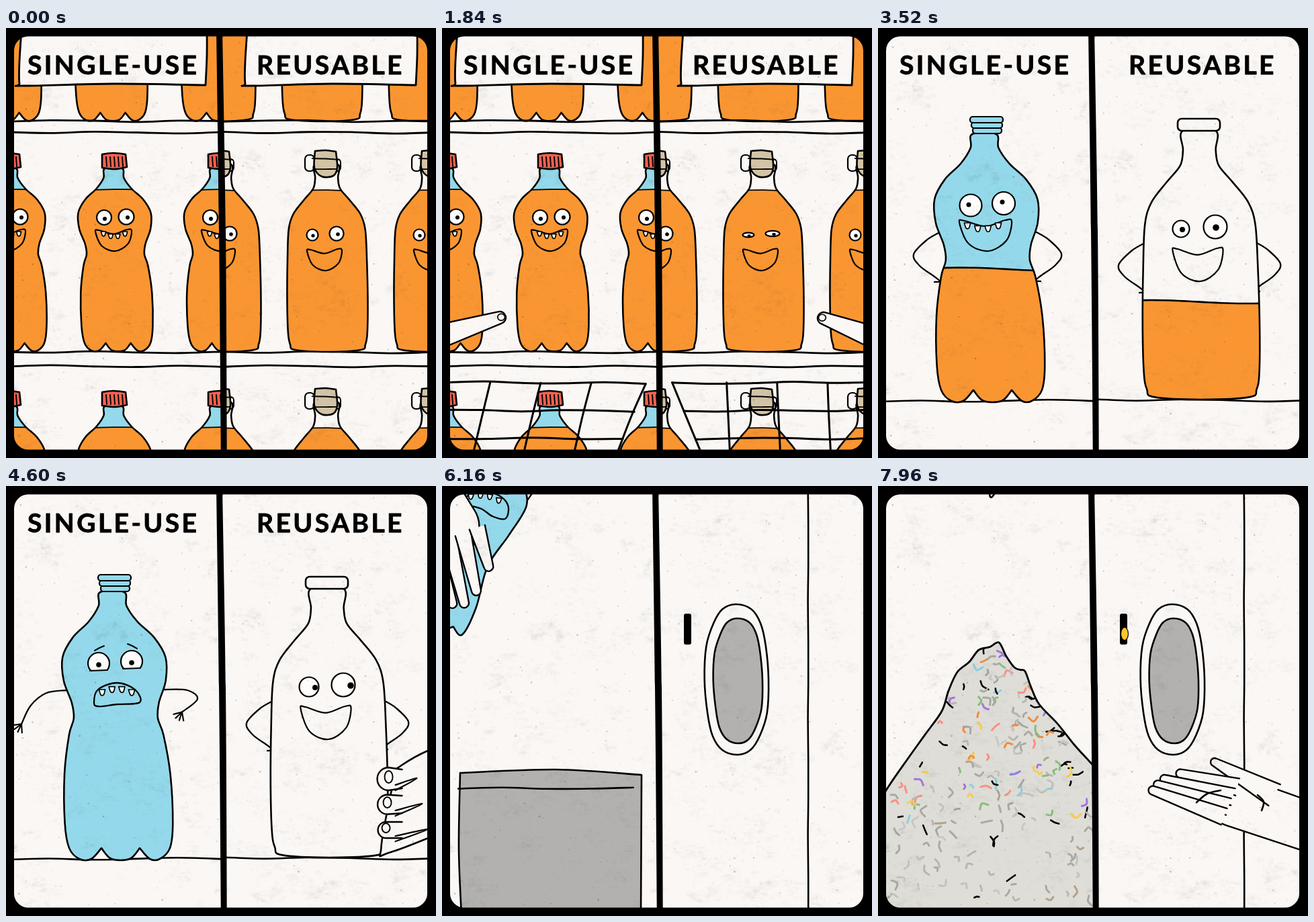
Recreate the animation shown at these times as an HTML page with a canvas. Size 640 by 640 pixels, loop 8 s.

```html
<!DOCTYPE html>
<html lang="en">
<head>
<meta charset="utf-8">
<title>Single-use and reusable</title>
<style>
html, body { margin: 0; width: 100%; height: 100%; overflow: hidden; background: #000; }
canvas { display: block; width: 100vw; height: 100vh; }
</style>
</head>
<body>
<canvas id="stage" width="640" height="640"></canvas>
<script>
const LOOP = 8000, INK = 2.6;
const PAPER = '#fbf7f4', ORANGE = '#fa9632', BLUE = '#94d9eb', GREY = '#b2b1b0', RED = '#f7614f', CORK = '#d3c4a6', WHITE = '#fffdfb';
const ctx = document.getElementById('stage').getContext('2d');

// --- Timing ---
const mix = (a, b, u) => a + (b - a) * u;
const span = (t, a, b) => Math.max(0, Math.min(1, (t - a) / (b - a)));
const ease = (t, a, b) => { const u = span(t, a, b); return u * u * (3 - 2 * u); };
const blink = (t, a, b) => 1 - Math.sin(Math.PI * span(t, a, b)) * .9;
function random(seed) {
  return () => (seed = (seed * 16807) % 2147483647) / 2147483647;
}

// --- Pen ---
// Smooth curve through [x, y] points; a third truthy entry makes a corner.
function spline(list, closed) {
  const pts = list.flatMap(p => p[2] ? [p, p] : [p]), n = pts.length, path = new Path2D();
  const get = i => pts[closed ? (i + n) % n : Math.max(0, Math.min(n - 1, i))];
  path.moveTo(pts[0][0], pts[0][1]);
  for (let i = 0; i < (closed ? n : n - 1); i++) {
    const a = get(i - 1), b = get(i), c = get(i + 1), d = get(i + 2);
    if (b === c) continue;
    path.bezierCurveTo(b[0] + (c[0] - a[0]) / 6, b[1] + (c[1] - a[1]) / 6,
      c[0] - (d[0] - b[0]) / 6, c[1] - (d[1] - b[1]) / 6, c[0], c[1]);
  }
  if (closed) path.closePath();
  return path;
}
function ink(path, color, w = INK) {
  if (color) { ctx.fillStyle = color; ctx.fill(path); }
  if (w) { ctx.lineWidth = w; ctx.stroke(path); }
}
const line = (pts, w) => ink(spline(pts), null, w);
const shape = (pts, color, w) => ink(spline(pts, true), color, w);
// Hand-drawn straight stroke.
function wire(x0, y0, x1, y1, w = INK) {
  const n = Math.max(2, Math.round(Math.hypot(x1 - x0, y1 - y0) / 60)), pts = [];
  for (let i = 0; i <= n; i++) {
    const off = 1.3 * Math.sin(i * 2.1 + x0 + y0);
    pts.push([mix(x0, x1, i / n) + off * .3, mix(y0, y1, i / n) + off]);
  }
  line(pts, w);
}
function oval(x, y, rx, ry, color, w = 2) {
  const path = new Path2D();
  path.ellipse(x, y, rx, ry, 0, 0, 7);
  ink(path, color, w);
}
function box(x, y, w, h, r, color, ink_ = INK) {
  const path = new Path2D();
  path.roundRect(x, y, w, h, r);
  ink(path, color, ink_);
}
// Tall rounded ring, squarer than an ellipse.
function hatch(cx, cy, rx, ry, color) {
  const pts = [], bend = v => Math.sign(v) * Math.abs(v) ** .85;
  for (let i = 0; i < 16; i++) {
    const a = i * Math.PI / 8;
    pts.push([cx + rx * bend(Math.cos(a)) + Math.sin(i * 2), cy + ry * bend(Math.sin(a))]);
  }
  shape(pts, color);
}
// Tapered arm or finger with an open base, a round tip and maybe a nail.
function limb(x0, y0, r0, x1, y1, r1, nail) {
  const a = Math.atan2(y1 - y0, x1 - x0), nx = -Math.sin(a), ny = Math.cos(a), path = new Path2D();
  path.moveTo(x0 + nx * r0, y0 + ny * r0);
  path.lineTo(x1 + nx * r1, y1 + ny * r1);
  path.arc(x1, y1, r1, a + Math.PI / 2, a - Math.PI / 2, true);
  path.lineTo(x0 - nx * r0, y0 - ny * r0);
  ink(path, PAPER, 2.4);
  if (nail) oval(x1 + Math.cos(a) * r1 * .25, y1 + Math.sin(a) * r1 * .25, r1 * .6, r1 * .55, PAPER, 1.7);
}
// Thin arm ending in a fan of little fingers.
function arm(pts, turn) {
  const [x, y] = pts[pts.length - 1];
  line(pts, 2.3);
  for (let i = -1.5; i < 2; i++) {
    const a = turn + i * .5;
    line([[x, y], [x + 13 * Math.cos(a), y + 13 * Math.sin(a)]], 2.1);
  }
}
function at(x, y, draw, turn = 0, px = 0, py = 0) {
  ctx.save();
  ctx.translate(x + px, y + py);
  ctx.rotate(turn);
  ctx.translate(-px, -py);
  draw();
  ctx.restore();
}
function inside(path, draw) {
  ctx.save();
  ctx.clip(path);
  draw();
  ctx.restore();
}
function flood(y, color, h = 600) {
  ctx.fillStyle = color;
  ctx.fillRect(0, y, 640, h);
}

// --- Bottles: [depth, half width] profiles shared by both sizes ---
const PET = [[0, 13], [14, 15], [30, 26], [46, 43], [66, 54], [90, 53], [112, 45], [128, 43], [145, 48], [185, 53], [235, 53], [260, 49]];
const GLASS = [[0, 17], [20, 17], [36, 20], [53, 34], [74, 50], [97, 57], [140, 59], [200, 60], [250, 59], [268, 56], [276, 49]];

function outline(profile, cx, top, bottom, wide, drift, flare, feet) {
  const depth = profile[profile.length - 1][0], k = (bottom - top) / (depth + (feet ? 11 : 2));
  const side = dir => profile.map(([y, r]) => {
    const u = y / depth;
    return [cx + drift * u + dir * r * (wide + flare * u), top + y * k];
  });
  const left = side(-1), right = side(1), base = [];
  const [a] = left[left.length - 1], [b] = right[right.length - 1];
  if (feet) [0, .32, .7, 1].forEach((f, i, cuts) => {
    if (!i) return;
    base.push([mix(a, b, cuts[i - 1] + .1), bottom], [mix(a, b, f - .1), bottom]);
    if (f < 1) base.push([mix(a, b, f), bottom - 11 * k, 1]);
  });
  else base.push([mix(a, b, .5), bottom + 1]);
  return spline([...left, ...base, ...right.reverse()], true);
}
const soda = outline(PET, 160, 209, 480, 1, 6, 0, true);
const flask = outline(GLASS, 477, 203, 481, 1, 2, 0);
const pet = outline(PET, 158, 158, 555, 1.38, 11, .15, true);
const glass = outline(GLASS, 478, 153, 552, 1.43, 4, .03);

function eye(x, y, r, dx, dy, pupil, open = 1) {
  oval(x, y, r, Math.max(1, r * open), WHITE, 2.2);
  oval(x + dx, y + dy, pupil, pupil * Math.min(1, open + .3), '#000', 0);
}
function grin(x, y, w, h, color) {
  const half = w / 2;
  shape([[x - half, y + 2], [x - half * .8, y], [x, y + h * .18], [x + half * .75, y - 1], [x + half, y + 1],
    [x + half * .8, y + h * .65], [x + half * .1, y + h], [x - half * .65, y + h * .75]], color, 2.2);
}
function teeth(x, y, w, size, sag) {
  for (let i = 0; i < 4; i++) {
    const f = i / 1.5 - 1, cx = x + f * w / 2, cy = y + sag * (1 - f * f);
    shape([[cx - size, cy, 1], [cx - size * .4, cy + size * 1.7], [cx + size * .5, cy + size * 1.7], [cx + size, cy, 1]], WHITE, 1.7);
  }
}
function drawSoda(face, open) {
  inside(soda, () => {
    flood(200, BLUE, 42);
    flood(241, ORANGE);
    wire(100, 241, 220, 241, 1.8);
  });
  ink(soda);
  shape([[143, 188, 1], [160, 186], [178, 188, 1], [180, 207, 1], [162, 210], [143, 208, 1]], RED);
  for (let x = 149; x < 176; x += 6) line([[x, 192], [x + 1, 206]], 1.9);
  if (!face) return;
  eye(146, 282, 11, 1, 2, 3, open);
  eye(179, 281, 11.5, 2, 1, 3, open);
  grin(160, 301, 54, 31, ORANGE);
  teeth(161, 303, 32, 3.6, 4);
}
function drawFlask(face, open) {
  inside(flask, () => {
    flood(200, PAPER, 43);
    flood(242, ORANGE);
    wire(440, 242, 520, 242, 1.8);
  });
  ink(flask);
  box(445, 189, 14, 24, 6, null, 2.2);
  box(486, 195, 12, 18, 5, null, 2);
  shape([[460, 183, 1], [476, 182], [491, 184, 1], [493, 208], [487, 220], [470, 221], [459, 208]], CORK);
  wire(456, 195, 496, 195, 1.9);
  wire(458, 209, 493, 211, 1.9);
  if (!face) return;
  eye(456, 308, 8.5, 1, 1, 2.6, open);
  eye(492, 306, 10.5, 2, 1, 2.8, open);
  grin(474, 330, 52, 31);
}

// --- Shelf ---
function shelf(x, bottle, gap) {
  for (let row = -1; row < 2; row++) {
    for (const col of [-1, 1]) at(gap * col - (row < 0 ? 8 : 0), row * 349 + (row < 0 ? 6 : 5 * row), () => bottle(!row));
    if (row) at(row * 4 - 4, row * 349 + (row < 0 ? 6 : 5), () => bottle(false));
    if (row < 1) [[138, 482], [155, 503]].forEach(ys => wire(x, ys[row + 1], x + 320, ys[row + 1] + 1, 2.8));
  }
}
function basket(t, edge, dir, lean) {
  if (t < 960) return;
  at(0, mix(112, 0, ease(t, 960, 1680)), () => {
    for (let j = 0; j < 3; j++) wire(edge - dir * 17 * j, 529 + 41 * j, edge - dir * 300, 527 + 42 * j, 3);
    for (let i = 0; i < 4; i++) {
      const x = edge - dir * (i && 6 + 75 * i);
      wire(x, 529, i ? x - lean : x - dir * 41, 628, 3);
    }
  });
}
// Draws a reaching finger, then the bottle carried down between the two halves of a hand.
function carry(t, dx, dy, point, back, bottle, front) {
  const k = ease(t, 2040, 2440), drop = Math.max(0, t - 2440) * .3, up = ease(t, 1840, 2040);
  const reach = ease(t, 1080, 1800), held = t >= 2040;
  const hand = draw => held && at(dx * (k - 1), dy * (k - 1) + drop, draw);
  hand(back);
  bottle(k, drop);
  hand(front);
  if (t > 960 && !held) at(Math.sign(point) * (110 * (1 - reach) - 20 * up), -50 * up, () =>
    point < 0 ? limb(-100, 489, 27, 86, 431, 9, true) : limb(760, 505, 28, 568, 432, 9, true));
}
const sign = (a, b) => shape([[a + 4, -10, 1], [a, 50], [a, 82], [a + 6, 86], [(a + b) / 2, 83], [b - 2, 85, 1], [b, 40], [b, -10, 1]], PAPER, 2.8);

function shelfLeft(t) {
  shelf(2, drawSoda, 158);
  carry(t, 47, 170, -1, () => {
    limb(-150, 488, 34, 140, 496, 33);
    for (let i = 0; i < 3; i++) limb(215, 490 + i * 17, 9, 231, 483 + i * 16, 8);
  }, (k, drop) => at(47 * k, 170 * k + drop, () => drawSoda(true, blink(t, 1240, 1480)), .27 * k, 161, 198),
  () => limb(100, 510, 17, 180, 528, 9, true));
  basket(t, 303, 1, 25);
  sign(20, 299);
}
function shelfRight(t) {
  shelf(322, drawFlask, 159);
  carry(t, 28, 115, 1, () => {
    limb(790, 483, 45, 600, 482, 44);
    for (let i = 0; i < 4; i++) limb(456, 447 + i * 20, 10, 445, 447 + i * 20, 10);
  }, (k, drop) => at(34 * k, 115 * k + drop, () =>
    drawFlask(true, Math.min(blink(t, 180, 500), blink(t, 1780, 2040))), .06 * k, 476, 202),
  () => limb(590, 500, 24, 492, 497, 10, true));
  basket(t, 343, -1, -4);
  sign(356, 612);
}

// --- Standing bottles ---
function vessel(path, base, level, t) {
  inside(path, () => {
    flood(100, base);
    if (level > 552) return;
    const wave = new Path2D();
    wave.moveTo(-9, 650);
    for (let x = -9; x < 650; x += 8) wave.lineTo(x, level + 2.5 * Math.sin(x / 45 + t / 130));
    wave.lineTo(650, 650);
    ink(wave, ORANGE);
  });
  ink(path);
}
const drain = (t, from, power) => mix(from, 556, 1 - (1 - span(t, 3440, 3920)) ** power);
const akimbo = (x, y, dir) =>
  line([[x, y], [x + dir * 20, y + 12], [x + dir * 39, y + 33], [x + dir * 30, y + 50], [x + dir * 8, y + 66], [x, y + 73], [x + dir * 8, y + 74]], 2.3);

function sadFace() {
  for (const [x, y, dir] of [[138, 264, 1], [187, 261, -1]]) {
    inside(spline([[x - 30, y - 30, 1], [x + 30, y - 30, 1], [x + 30, y + 10, 1], [x - 30, y + 12, 1]], true), () => eye(x, y, 16, 0, 2, 3.8));
    line([[x - 13, y + 11], [x + 13, y + 10]], 2.2);
    line([[x + 1 - dir * 7, y - 19], [x + 1, y - 23], [x + 1 + dir * 7, y - 26]], 2);
  }
  shape([[131, 322], [137, 303], [165, 293], [192, 303], [199, 322], [165, 325], [137, 328]], null, 2.3);
  teeth(165, 303, 44, 4.6, -5);
}
function standLeft(t) {
  const sad = t >= 4160, lift = ease(t, 5980, 6160) * -130;
  wire(0, 556, 320, 554);
  at(0, lift, () => {
    if (sad) {
      const wave = Math.sin(span(t, 4440, 5300) * Math.PI * 4) * .08;
      at(0, 0, () => arm([[90, 304], [60, 310], [38, 330], [26, 358]], 2.2), wave, 90, 304);
      at(0, 0, () => arm([[235, 303], [270, 306], [284, 320], [260, 338]], 2.2), -wave, 235, 303);
    } else {
      akimbo(92, 304, -1);
      akimbo(234, 303, 1);
    }
    vessel(pet, BLUE, drain(t, 197, 3.25), t);
    for (let i = 2; i >= 0; i--) box(137 + i * 2, 132 + i * 8, 49 - i * 3, 9, 4, BLUE, 2.2);
    if (sad) return sadFace();
    const open = blink(t, 3620, 3860);
    eye(138, 264, 16.5, -3, -1, 3.5, open);
    eye(187, 261, 17, -2, -2, 3.5, open);
    grin(160, 287, 78, 45);
    teeth(156, 290, 46, 4.6, 5);
  });
  if (t > 5600) at(mix(-190, 0, ease(t, 5600, 5980)), 150 + lift, crushHand);
}
function grabHand() {
  shape([[900, 250, 1], [627, 322], [530, 358], [485, 384, 1], [463, 500], [480, 507], [627, 452], [900, 370, 1]], PAPER);
  limb(720, 310, 32, 566, 396, 16, true);
  for (let i = 0; i < 3; i++) {
    const y = 399 + i * 38;
    limb(494, y, 14 - i, 474 - i * 2, y, 17 - i * 2.5);
    oval(474 - i * 2, y - 3, 6, 9 - i, PAPER, 1.9);
    line([[484, y + 17], [516 + i * 8, y - 1], [484, y + 9]], 2.2);
  }
}
function standRight(t) {
  const lift = ease(t, 4840, 5080), lower = ease(t, 5080, 5320), leave = ease(t, 5420, 5880);
  const x = 30 * lift + 42 * lower + 290 * leave, y = -110 * lift + 73 * lower - 50 * leave;
  const look = t > 4520;
  wire(320, 553, 640, 555);
  at(x, y, () => {
    if (t > 4840) arm([[394, 327], [365, 353], [325, 376]], 2.6);
    else { akimbo(397, 320, -1); akimbo(560, 318, 1); }
    vessel(glass, PAPER, drain(t, 215, 4.5), t);
    box(446, 135, 63, 18, 6, PAPER);
    const open = blink(t, 3620, 3860);
    eye(451, 299, look ? 14.5 : 12.5, look ? 9 : 2, 1, 4, open);
    eye(502, 296, 17.5, look ? 11 : 1, 1, 4.8, open);
    grin(476, 329, 75, 48);
  });
  if (t > 4440) at(x - 72 + mix(260, 0, ease(t, 4440, 4840)), y + 37, grabHand);
}

// --- Bin, heap and machine ---
function crushHand() {
  limb(-90, -80, 62, 100, 190, 47);
  for (let i = 0; i < 4; i++) {
    const u = i / 3;
    limb(mix(82, 144, u), mix(222, 190, u), 12, mix(109, 162, u), mix(304, 248, u) + 40 * u * (1 - u) * 2, 7);
  }
}
function crushed() {
  arm([[104, 142], [100, 108], [90, 71]], -1.8);
  arm([[215, 152], [228, 130], [236, 102]], -1.5);
  // Bent spine: x, y, half width.
  const spine = [[205, 62, 17], [194, 80, 15], [174, 105, 42], [161, 140, 57], [146, 185, 47], [125, 232, 38], [96, 282, 55], [72, 318, 61]];
  const edges = spine.map(([x, y, r], i) => {
    const a = spine[Math.max(0, i - 1)], b = spine[Math.min(spine.length - 1, i + 1)];
    const d = Math.hypot(b[0] - a[0], b[1] - a[1]), nx = (b[1] - a[1]) / d * r, ny = (a[0] - b[0]) / d * r;
    return [[x - nx, y - ny], [x + nx, y + ny]];
  });
  const left = edges.map(e => e[0]), right = edges.map(e => e[1]), feet = [];
  const a = left[left.length - 1], b = right[right.length - 1];
  for (let i = 1; i < 7; i++) {
    const u = i / 7, out = i % 3 ? 14 : -2;
    feet.push([mix(a[0], b[0], u) - out * .5, mix(a[1], b[1], u) + out, i % 3 === 0]);
  }
  shape([...left, ...feet, ...right.reverse()], BLUE);
  at(0, 0, () => oval(205, 61, 18, 8, BLUE, 2.3), .85, 205, 61);
  eye(146, 119, 11.5, -1, 0, 3);
  eye(185, 129, 12, 0, 1, 3);
  line([[140, 101], [147, 98], [153, 102]], 2);
  line([[183, 116], [191, 115], [197, 119]], 2);
  shape([[122, 156], [130, 143], [152, 138], [176, 145], [188, 160], [184, 178], [165, 175], [148, 164]], null, 2.3);
  at(0, 0, () => teeth(153, 145, 42, 4, -4), .12, 153, 145);
}
function binLeft(t) {
  const fall = span(t, 6960, 7260), out = ease(t, 6160, 6560) - 1, away = ease(t, 6960, 7240);
  const sway = Math.sin((6840 - t) / 75) * .05 * span(t, 6840, 6600);
  at(90 * out + 45 * fall, 130 * out + 480 * fall * fall, crushed, sway - fall * .5, 150, 200);
  at(90 * out - 180 * away, 130 * out - 180 * away, crushHand, sway, 60, 100);
  shape([[27, 427, 1], [170, 422], [297, 430, 1], [296, 640, 1], [29, 640, 1], [25, 540]], GREY);
  wire(24, 450, 285, 450);
}

const shards = ['#a9a8a4', '#c4c2bd', '#b8b6b1', '#aaa9a5', '#c9c7c2', '#b3a18c', '#f28b3c', '#a177dc', '#ffcb4a', '#8ecfe2', '#86bd7e', '#fb8f83'];
const ridge = [];
{
  const rnd = random(19), keys = [[-10, 490], [45, 405], [95, 335], [118, 277], [150, 244], [180, 233], [203, 270], [219, 276], [240, 325], [292, 385], [335, 432]];
  keys.forEach(([x, y], i) => {
    ridge.push([x, y]);
    const next = keys[i + 1];
    if (next) ridge.push([mix(x, next[0], .5) + rnd() * 4 - 2, mix(y, next[1], .5) + rnd() * 4 - 2]);
  });
}
const heapPath = spline([...ridge, [340, 660, 1], [-20, 660, 1]], true);
function heap(t) {
  at(0, mix(420, 0, ease(t, 7320, 7680)), () => {
    ink(heapPath, '#deddd7', 0);
    inside(heapPath, () => {
      const rnd = random(77);
      for (let i = 0; i < 230; i++) {
        const y = 245 + 375 * rnd() ** .8, half = 20 + (y - 240) * .64, edge = rnd() * 2 - 1;
        const dark = rnd() < (Math.abs(edge) > .7 ? .4 : .05), len = 3 + rnd() * 5, bend = rnd() * 2 - 1;
        ctx.strokeStyle = dark ? '#000' : shards[Math.floor(rnd() * (y > 500 ? 6 : shards.length))];
        at(178 + edge * half, y, () => line([[-len, 0], [0, len * bend], [len, dark ? len * bend : 0]], dark ? 2.6 : 3), rnd() * 6.3);
      }
    });
    line(ridge, 2.8);
  });
  if (t > 7880) at(0, mix(-30, 0, span(t, 7880, 7960)), () => line([[164, -4], [167, 16], [173, 12], [180, -4]]));
}
function pushHand() {
  shape([[540, 330], [640, 270, 1], [900, 270, 1], [900, 400, 1], [640, 372], [560, 372]], PAPER, 0);
  limb(720, 275, 27, 620, 272, 20);
  limb(620, 272, 19, 545, 297, 10, true);
  for (let i = 3; i >= 0; i--) {
    const x = 540 + i * 27, y = 364 - i * 6;
    oval(x, y, 13 + i * 2.5, 14 + i * 4, PAPER, 2.4);
    oval(x - i * .5, y - 2 - i * 3, 6, 6, PAPER, 1.7);
  }
}
function openHand() {
  limb(760, 548, 35, 530, 469, 38);
  limb(590, 460, 18, 501, 411, 6);
  for (let i = 0; i < 4; i++) {
    const u = i / 3;
    limb(mix(535, 515, u), mix(448, 492, u), 13, mix(450, 409, Math.sqrt(u)), mix(428, 453, u), 6.5);
  }
  line([[474, 471], [490, 458], [510, 453]]);
  line([[565, 460], [574, 470], [571, 483]]);
}
function machine(t) {
  wire(545, 0, 545, 640);
  box(360, 190, 11, 46, 3, '#000', 0);
  const coin = span(t, 7780, 7920);
  if (coin) oval(367, 220, 5.5 * coin, 9.5, '#fbc52d', 1.2);
  hatch(438.5, 288, 47.5, 112, PAPER);
  hatch(440.5, 290, 36.5, 93, GREY);
  const push = mix(318, 0, ease(t, 6160, 6720)) - 60 * ease(t, 6840, 7160);
  if (t < 7160) inside(spline([[412, 0, 1], [700, 0, 1], [700, 640, 1], [412, 640, 1]], true), () => at(push, 0, () => {
    line([[320, 224], [440, 227], [500, 233], [540, 246], [568, 263]]);
    line([[320, 362], [440, 369], [500, 374], [541, 374]]);
  }));
  if (t < 7400) at(push + 330 * ease(t, 7160, 7400), 0, pushHand);
  else at(mix(260, 0, ease(t, 7400, 7740)), 0, openHand);
}

// --- Paper grain, title and frame ---
const grain = document.createElement('canvas');
grain.width = grain.height = 640;
{
  const g = grain.getContext('2d'), rnd = random(4242);
  g.fillStyle = '#fff';
  g.fillRect(0, 0, 640, 640);
  for (let i = 0; i < 300; i++) {
    const cx = rnd() * 640, cy = rnd() * 640, size = 12 + rnd() * 30;
    for (let j = 0; j < 24; j++) {
      g.fillStyle = `rgba(100,110,115,${.01 + rnd() * .02})`;
      g.fillRect(cx + (rnd() + rnd() - 1) * size, cy + (rnd() + rnd() - 1) * size * .7, 1 + rnd() * 9, 1 + rnd() * 5);
    }
  }
  for (let i = 0; i < 600; i++) {
    g.fillStyle = `rgba(80,75,70,${.08 + rnd() * .25})`;
    g.beginPath();
    g.arc(rnd() * 640, rnd() * 640, .4 + rnd() * rnd() * 1.2, 0, 7);
    g.fill();
  }
}
function title() {
  ctx.font = '700 39px Lato, "Open Sans", sans-serif';
  ctx.letterSpacing = '3.4px';
  ctx.fillStyle = '#000';
  ctx.lineWidth = .8;
  for (const [word, x] of [['SINGLE-USE', 32], ['REUSABLE', 373]]) {
    ctx.fillText(word, x, 69);
    ctx.strokeText(word, x, 69);
  }
}
function panel(x, y, draw, t) {
  ctx.save();
  ctx.beginPath();
  ctx.rect(x, 0, 320, 640);
  ctx.clip();
  at(0, y, () => draw(t));
  ctx.restore();
}
function draw(t) {
  ctx.lineJoin = ctx.lineCap = 'round';
  ctx.strokeStyle = '#000';
  flood(0, PAPER, 640);
  const slide = ease(t, 2520, 2760) * 616;
  const scene = (y, left, right) => { panel(0, y, left, t); panel(320, y, right, t); };
  if (t < 2760) scene(-slide, shelfLeft, shelfRight);
  if (t >= 2520 && t < 6160) scene(616 - slide, standLeft, standRight);
  if (t >= 6160) scene(0, t < 7320 ? binLeft : heap, machine);
  if (t < 6160) title();
  ctx.globalCompositeOperation = 'multiply';
  ctx.drawImage(grain, 0, 0);
  ctx.globalCompositeOperation = 'source-over';
  shape([[313, 0, 1], [317, 300], [320, 640, 1], [329, 640, 1], [327, 300], [322, 0, 1]], '#000', 0);
  const frame = new Path2D();
  frame.rect(0, 0, 640, 640);
  frame.roundRect(12, 12.5, 615, 615, 21);
  ctx.fillStyle = '#000';
  ctx.fill(frame, 'evenodd');
}
const start = performance.now();
function tick() {
  draw((performance.now() - start) % LOOP);
  requestAnimationFrame(tick);
}
tick();
</script>
</body>
</html>
```
